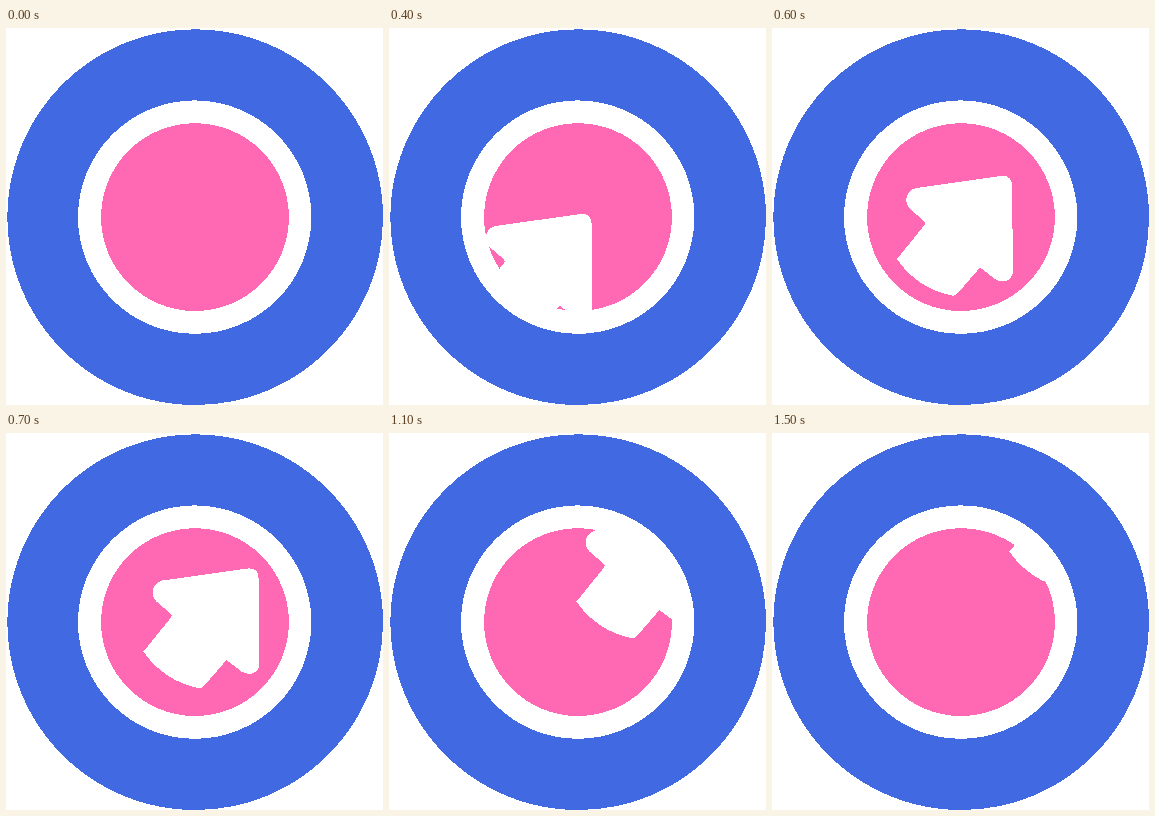
Write an HTML page that moves like this. It is 377 px wide and 377 px high and loops after 1.6 s.

```html
<!DOCTYPE html>
<html lang="en">
<head>
<meta charset="utf-8">
<title>Arrow through a disc</title>
<style>
  html, body { margin: 0; width: 100%; height: 100%; overflow: hidden; background: #fff; }
  svg { display: block; width: 100vw; height: 100vh; shape-rendering: crispEdges; }

  .arrow { fill: #fff; animation: fly 1600ms infinite; }

  /* The arrow jumps every 100 ms: a steep entry, then an even diagonal.
     Moving x and y instead of a transform keeps its edges crisp. */
  @keyframes fly {
    0%    { x: -200px;   y: 200px;  animation-timing-function: step-end; }
    6.25% { x: -75px;    y: 112px;  animation-timing-function: step-end; }
    12.5% { x: -63px;    y: 87px;   animation-timing-function: steps(2, end); }
    25%   { x: -37.5px;  y: 38px;   animation-timing-function: steps(2, end); }
    37.5% { x: 0px;      y: 0px;    animation-timing-function: steps(10, end); }
    100%  { x: 125px;    y: -125px; }
  }
</style>
</head>
<body>
<svg viewBox="0 0 377 377">
  <defs>
    <clipPath id="hole"><circle cx="188.7" cy="189.1" r="116"/></clipPath>
    <path id="arrow" d="M144 160 L229 148 C236 147 240 151 240 157 L241 243
      C241 253 231 256 223 251 L208 239.5 L185 266 Q183 268 180 267.5
      A85 85 0 0 1 125 231 L152.5 197 Q154 194.5 152 193 L138 181
      C131 174 134 162 144 160 Z"/>
  </defs>
  <circle cx="189.2" cy="189.2" r="187.8" fill="#4169e1"/>
  <circle cx="188.7" cy="189.1" r="116.7" fill="#fff"/>
  <circle cx="189" cy="189.1" r="93.9" fill="#ff69b4"/>
  <g clip-path="url(#hole)">
    <use class="arrow" href="#arrow"/>
  </g>
</svg>
</body>
</html>
```
